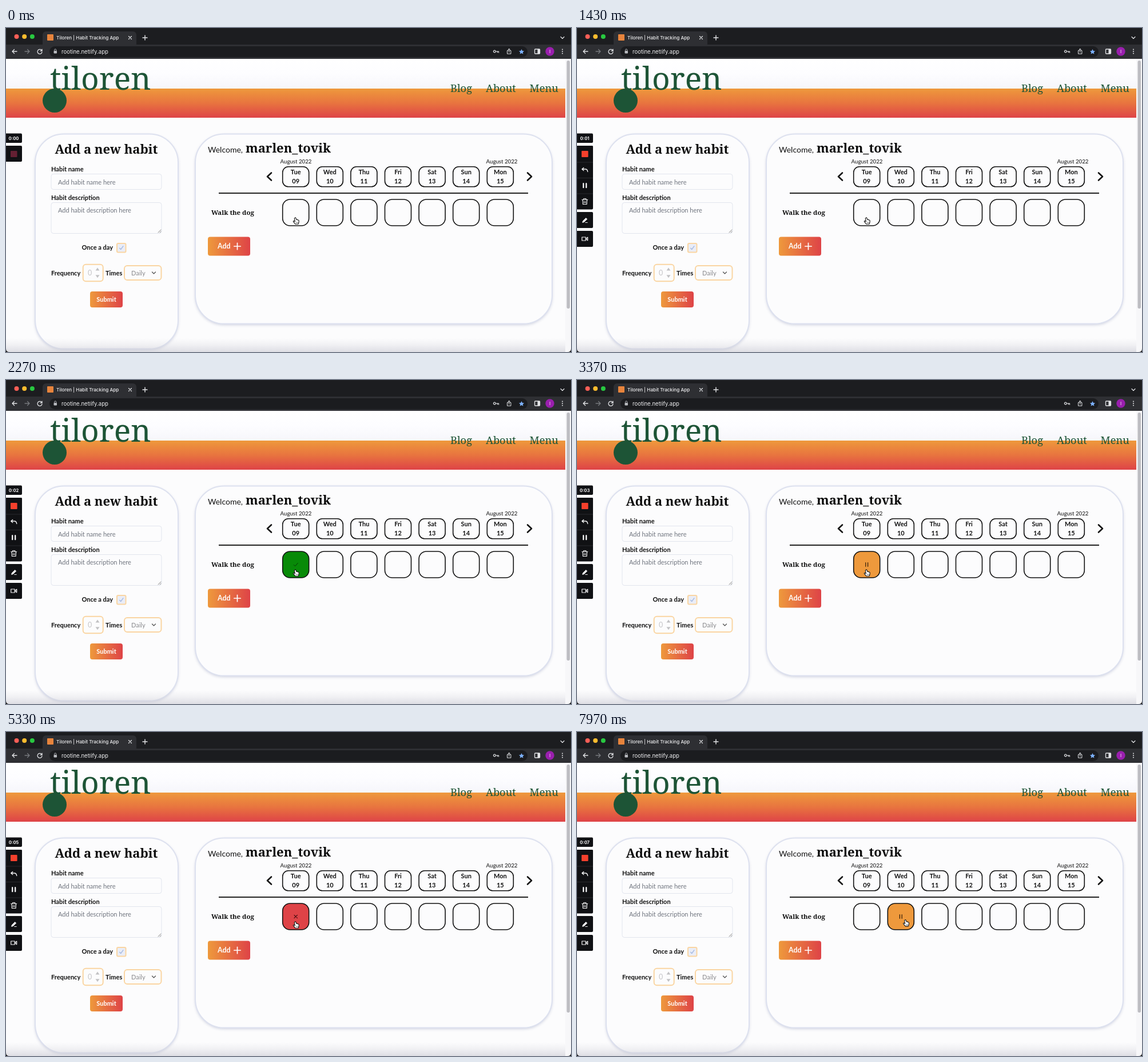
An HTML page with a canvas that plays this animation: 988x567 px, repeating every 8000 ms.

```html
<!DOCTYPE html>
<html lang="en">
<head>
<meta charset="utf-8">
<title>Habit tracker</title>
<style>
  html, body { margin: 0; width: 100%; height: 100%; overflow: hidden; background: #fcfcfc; }
  canvas { display: block; width: 988px; height: 567px; }
</style>
</head>
<body>
<canvas id="stage" width="988" height="567"></canvas>
<script>
const ctx = document.getElementById('stage').getContext('2d');
const LOOP = 8000;
const LATO = 'Lato, sans-serif', SERIF = '"Noto Serif", serif', UI = 'Inter, sans-serif';
const ORANGE = '#ee993c', RED = '#de4347', GREEN = '#088a08', FOREST = '#1d5436', PAPER = '#fcfcfd';
const DAYS = ['Tue', 'Wed', 'Thu', 'Fri', 'Sat', 'Sun', 'Mon'];
const cellX = i => 483.7 + i * 59.6;

// Cell states over time: [start, column, state]
const CLICKS = [
  [1450, 0, 'done'], [2800, 0, 'paused'], [4280, 0, 'missed'], [5480, 0, ''],
  [6560, 1, 'done'], [7450, 1, 'paused']
];
const FILLS = { done: GREEN, paused: ORANGE, missed: RED };

const clamp = v => Math.max(0, Math.min(1, v));
const ease = v => v * v * (3 - 2 * v);
const progress = (t, from, to) => ease(clamp((t - from) / (to - from)));

function text(str, x, y, font, color, align = 'left') {
  ctx.font = font;
  ctx.fillStyle = color;
  ctx.textAlign = align;
  ctx.fillText(str, x, y);
}

function box(x, y, w, h, r, fill, stroke, width = 1) {
  ctx.beginPath();
  ctx.roundRect(x, y, w, h, r);
  if (fill) { ctx.fillStyle = fill; ctx.fill(); }
  if (stroke) { ctx.strokeStyle = stroke; ctx.lineWidth = width; ctx.stroke(); }
}

function disc(x, y, r, fill) {
  ctx.beginPath();
  ctx.arc(x, y, r, 0, Math.PI * 2);
  ctx.fillStyle = fill;
  ctx.fill();
}

function path(d, x, y, stroke, width, fill) {
  ctx.save();
  ctx.translate(x, y);
  ctx.lineCap = ctx.lineJoin = 'round';
  const p = new Path2D(d);
  if (fill) { ctx.fillStyle = fill; ctx.fill(p); }
  if (stroke) { ctx.strokeStyle = stroke; ctx.lineWidth = width; ctx.stroke(p); }
  ctx.restore();
}

function gradient(x0, y0, x1, y1, ...colors) {
  const g = ctx.createLinearGradient(x0, y0, x1, y1);
  colors.forEach((c, i) => g.addColorStop(i / (colors.length - 1), c));
  return g;
}

function browser() {
  const ink = '#e4e5e8';
  ctx.fillStyle = '#1c1d20';
  ctx.fillRect(0, 0, 988, 30);
  ctx.fillStyle = '#2e2f33';
  ctx.fillRect(0, 29, 988, 25);
  ['#ff5f57', '#febc2e', '#28c840'].forEach((c, i) => disc(18.5 + i * 13.7, 15, 4, c));
  box(64, 6, 164, 25, [6, 6, 0, 0], '#2e2f33');
  box(72, 11, 11, 11, 1, '#e8843c');
  text('Tiloren | Habit Tracking App', 88, 20, '500 8.2px ' + UI, '#f0f0f2');
  path('M-2.5-2.5 2.5 2.5M2.5-2.5-2.5 2.5', 217, 17, ink, 1.2);
  path('M-4 0H4M0-4V4', 243, 17, ink, 1.4);
  path('M-3-1.5 0 1.5 3-1.5', 973, 17, ink, 1.2);

  path('M4 0H-4M-.5-3.5-4 0-.5 3.5', 15, 41, ink, 1.3);
  path('M-4 0H4M.5-3.5 4 0 .5 3.5', 37, 41, '#77797e', 1.3);
  path('M3-2.5A4 4 0 1 0 4 1M4-4V-1H1', 59, 41.2, ink, 1.3);
  box(76, 32, 836, 19, 9.5, '#1b1c1f');
  box(83.5, 40, 5.5, 4.5, 1, '#b9bbc0');
  path('M-1.6 0V-1.5A1.6 1.6 0 0 1 1.6-1.5V0', 86.2, 40, '#b9bbc0', 1);
  text('rootine.netlify.app', 97, 44.5, '9.6px ' + UI, '#f0f0f2');
  path('M-.8 0A1.9 1.9 0 1 1-.8-.1M-.8 0H4.5V2M2.4 0V1.7', 857, 41, ink, 1.2);
  path('M-1.5-1.5H-3.2V4.2H3.2V-1.5H1.5M0 1.5V-4.5M-2-2.7 0-4.7 2-2.7', 879.7, 41, ink, 1);
  path('M0-4.6 1.4-1.6 4.6-1.3 2.2.9 2.9 4.1 0 2.4-2.9 4.1-2.2.9-4.6-1.3-1.4-1.6Z', 901.5, 41.5, null, 0, '#7cb0fb');
  box(924.5, 37, 9, 8, 1, null, ink, 1.3);
  ctx.fillStyle = ink;
  ctx.fillRect(929.5, 37, 4, 8);
  disc(951, 41, 7.7, '#9a1fae');
  text('I', 951, 44, '8px ' + UI, '#fff', 'center');
  [-3.4, 0, 3.4].forEach(d => disc(973, 41 + d, 1, ink));
}

function header() {
  ctx.fillStyle = gradient(0, 54, 0, 106, '#ffffff', '#fdfdff', '#f6f6fb');
  ctx.fillRect(0, 54, 978, 52);
  ctx.fillStyle = gradient(0, 106, 0, 157, ORANGE, '#e8743f', RED);
  ctx.fillRect(0, 106, 978, 51);
  disc(85, 127, 21, FOREST);
  text('tiloren', 77, 108, '55px ' + SERIF, FOREST);
  [['Blog', 777], ['About', 839], ['Menu', 915.5]].forEach(([s, x]) => text(s, x, 112, '18.3px ' + SERIF, FOREST));
}

function card(x, y, w, h) {
  ctx.save();
  ctx.shadowColor = 'rgba(90,100,150,.3)';
  ctx.shadowBlur = 5;
  ctx.shadowOffsetY = 2;
  box(x, y, w, h, 50, PAPER);
  ctx.restore();
  box(x, y, w, h, 50, null, '#dde1ef', 2);
}

function button(x, y, w, h) {
  box(x, y, w, h, 4, gradient(x, y, x + w, y, ORANGE, RED));
}

function form() {
  const bold = 'bold 11px ' + LATO, plain = '11px ' + LATO, peach = '#fad5a2', hint = '#70757f';
  card(51, 185.5, 250, 376);
  text('Add a new habit', 175.5, 220, 'bold 22px ' + SERIF, '#0c0c0c', 'center');
  text('Habit name', 79, 251, bold, '#111');
  box(79, 255.5, 193, 27, 4, PAPER, '#e2e5ee');
  text('Add habit name here', 91, 273.5, plain, hint);
  text('Habit description', 79, 300.5, bold, '#111');
  box(79, 305.5, 193, 54, 4, PAPER, '#e2e5ee');
  text('Add habit description here', 91, 322.5, plain, hint);
  path('M-5 0 0-5M-2 0 0-2', 271, 358, '#777', .9);
  text('Once a day', 132.5, 388, bold, '#111');
  box(194, 377, 15.5, 15.5, 2, '#eaedf7', peach, 2);
  path('M-3 .5-1 2.7 3.2-3', 201.7, 384.8, '#a9bde4', 1.5);
  text('Frequency', 79, 432.5, bold, '#111');
  box(134.7, 413.7, 35, 29.5, 5, PAPER, peach, 2);
  text('0', 143, 433, '12.5px ' + LATO, '#c5c5c8');
  path('M-3.5 2.5 0-2.5 3.5 2.5Z', 160, 422, null, 0, '#c2c2c4');
  path('M-3.5-2.5 0 2.5 3.5-2.5Z', 160, 434.8, null, 0, '#c2c2c4');
  text('Times', 174, 432.5, bold, '#111');
  box(207, 416, 64.5, 25, 5, PAPER, peach, 2);
  text('Daily', 219, 432.5, plain, '#8a8a8d');
  path('M-3-1.5 0 1.5 3-1.5', 258.5, 428.5, '#555', 1.3);
  button(147, 461, 57, 28);
  text('Submit', 175.5, 479, bold, '#fff', 'center');
}

function glyph(state, x, y, alpha) {
  ctx.globalAlpha = alpha;
  if (state === 'done') path('M-3.5.5-1.2 2.8 3.7-2.6', x, y, '#073807', 1);
  if (state === 'paused') path('M-1.9-3.3V3.3M1.9-3.3V3.3', x, y, '#2c1a08', 1.2);
  if (state === 'missed') path('M-2.7-2.7 2.7 2.7M2.7-2.7-2.7 2.7', x, y, '#3a0a0c', 1.1);
  ctx.globalAlpha = 1;
}

function cell(i, t) {
  const x = cellX(i), y = 300;
  box(x, y, 46, 46, 13, PAPER);
  let last = '';
  for (const [start, column, state] of CLICKS) {
    if (column !== i || t < start) continue;
    const k = progress(t, start, start + 150);
    ctx.globalAlpha = k;
    box(x, y, 46, 46, 13, FILLS[state] || PAPER);
    ctx.globalAlpha = 1;
    last = [state, k];
  }
  if (last) glyph(last[0], x + 23, y + 23, last[1]);
  box(x, y, 46, 46, 13, null, '#111', 1.6);
}

function tracker(t) {
  card(331, 185.5, 624, 332);
  text('Welcome,', 353, 217.5, '14px ' + LATO, '#111');
  text('marlen_tovik', 419, 218, 'bold 22px ' + SERIF, '#0c0c0c');
  text('August 2022', 507, 237, '9.7px ' + LATO, '#111', 'center');
  text('August 2022', 867, 237, '9.7px ' + LATO, '#111', 'center');
  path('M3.5-6.5-3.5 0 3.5 6.5', 460.5, 260, '#111', 2.6);
  path('M-3.5-6.5 3.5 0-3.5 6.5', 915.5, 260, '#111', 2.6);
  DAYS.forEach((day, i) => {
    const x = cellX(i);
    box(x, 242.8, 46, 35, 10, PAPER, '#111', 1.6);
    text(day, x + 23, 256, 'bold 11px ' + LATO, '#111', 'center');
    text(String(9 + i).padStart(2, '0'), x + 23, 272, 'bold 11px ' + LATO, '#111', 'center');
    cell(i, t);
  });
  ctx.fillStyle = '#222';
  ctx.fillRect(372, 288, 541, 2);
  text('Walk the dog', 359, 327, 'bold 11.4px ' + SERIF, '#111');
  button(353, 365.5, 74, 33);
  text('Add', 370, 386.3, 'bold 12.3px ' + LATO, '#fff');
  path('M-5.7 0H5.7M0-5.7V5.7', 404.5, 382, '#fff', 1.7);
}

function recorder(t) {
  const dark = '#101114', white = '#f4f4f5';
  const open = progress(t, 30, 350);
  box(-4, 184.5, 32, 16.5, 2, dark);
  text('0:0' + Math.floor(Math.max(0, t - 10) / 1000), 13.5, 195.6, 'bold 7.6px ' + UI, white, 'center');
  box(-4, 206, 32, 28, 2, dark);
  ctx.globalAlpha = open;
  box(-4, 206, 32, 111.5, 2, dark);
  box(-4, 322, 32, 28, 2, dark);
  box(-4, 355, 32, 28, 2, dark);
  ctx.fillStyle = '#292a2e';
  [234.5, 262, 289.5].forEach(y => ctx.fillRect(0, y, 28, 1));
  path('M-2-4-5-1.5-2 1M-5-1.5H1Q4.5-1.5 5 3', 13.7, 248.5, white, 1.4);
  path('M-2.5-3.5V3.5M2.5-3.5V3.5', 13.7, 275.7, white, 2.3);
  path('M-5-3H5M-2-3V-5H2V-3M-3.8-3-3.3 5H3.3L3.8-3M-1.2 0V2.5M1.2 0V2.5', 13.7, 303.5, white, 1.2);
  path('M-4 3.5-3.4 1.3 2-4 4-2-1.2 3ZM1 4H4.5', 13.7, 336.5, white, 1, white);
  path('M-5-3H1.5V3H-5ZM2.5-.5 5-2.8V2.8L2.5.5', 13.7, 369, white, 1.2);
  ctx.globalAlpha = 1;
  box(8, 215, 11.5, 11, 1, '#642033');
  ctx.globalAlpha = open;
  box(8, 215, 11.5, 11, 1, '#f5402c');
  ctx.globalAlpha = 1;
}

function pointer(t) {
  const k = progress(t, 6000, 6330);
  const hand = 'M-1.5-5.2Q-.4-6.3.4-5L1.3-2.2Q2.2-2.9 2.9-1.9 3.9-2.4 4.4-1.3 5.5-1.5 5.7-.2L5.6 2.6 4.6 5.6H-.6L-3.9 1.5Q-4.6.3-3.4 0-2.5 0-1.2 1.2L-2.1-3.8Q-2.2-4.7-1.5-5.2Z';
  const x = 506.5 + 68.3 * k, y = 337.6 - 3.3 * k;
  path(hand, x, y, '#161616', 1.1, '#fff');
  path('M1 2V4M2.6 2V4M4.1 2V4', x, y, '#333', .5);
}

function windowEdges() {
  ctx.fillStyle = '#f7f7f9';
  ctx.fillRect(978, 54, 10, 513);
  box(980.5, 57, 5.5, 434, 2.7, '#bdbdc2');
  ctx.fillStyle = gradient(0, 543, 0, 567, 'rgba(205,205,214,0)', 'rgba(205,205,214,.25)', 'rgba(205,205,214,.65)');
  ctx.fillRect(0, 543, 978, 24);
  path('M0 0V-6Q0 0 6 0Z', 0, 567, null, 0, '#111');
  path('M0 0V-6Q0 0-6 0Z', 988, 567, null, 0, '#111');
}

function frame(now) {
  const t = now % LOOP;
  ctx.fillStyle = PAPER;
  ctx.fillRect(0, 0, 988, 567);
  browser();
  header();
  form();
  tracker(t);
  windowEdges();
  recorder(t);
  pointer(t);
  requestAnimationFrame(frame);
}
requestAnimationFrame(frame);
</script>
</body>
</html>
```
